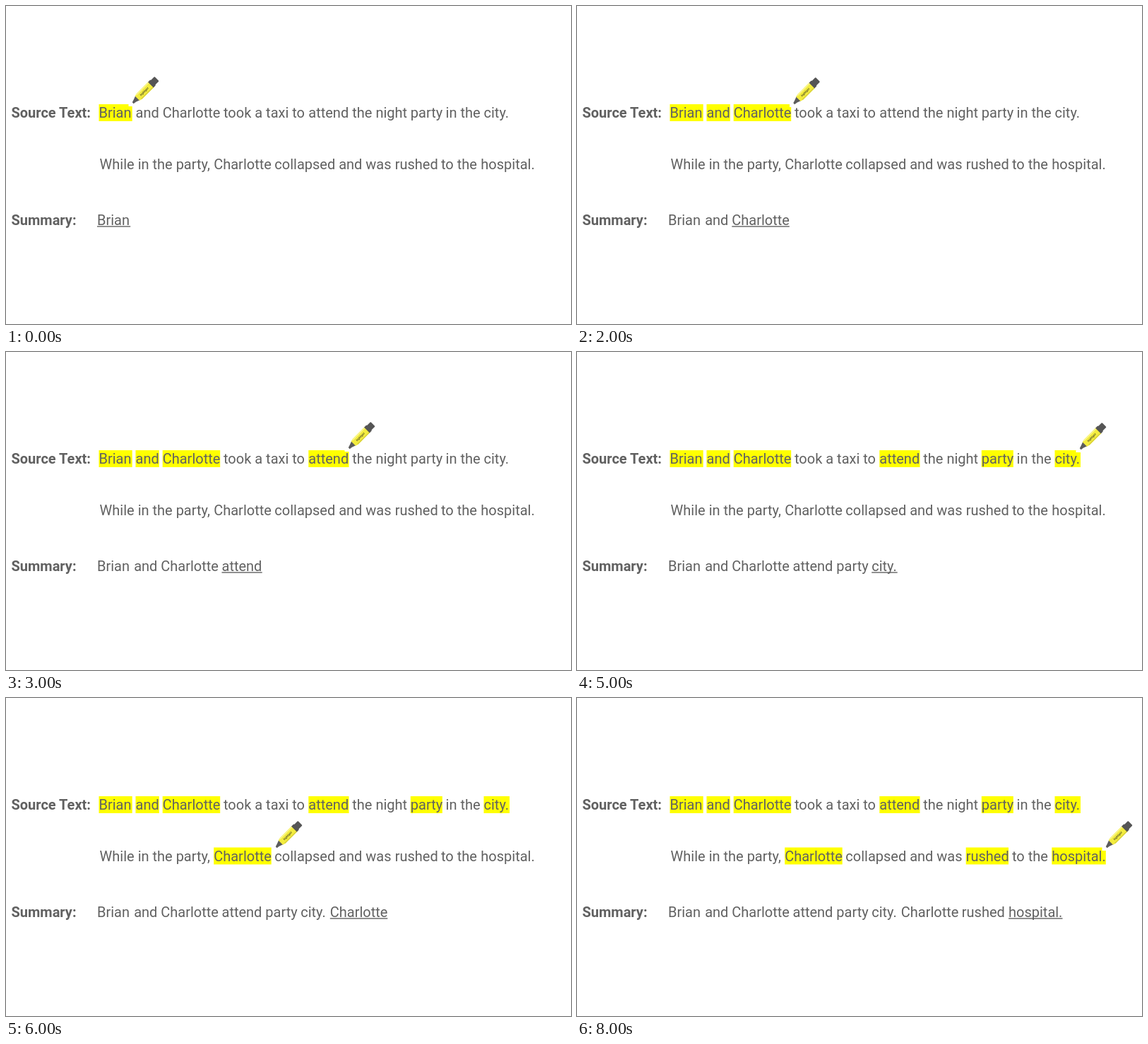
Animation of 800x450 px, one loop 9000 ms. Source, as an HTML page:

```html
<!DOCTYPE html>
<html lang="en">
<head>
<meta charset="utf-8">
<title>Extractive summary</title>
<style>
  html, body { margin: 0; width: 100%; height: 100%; overflow: hidden; background: #fff; }
  svg { display: block; width: 800px; height: 450px; }
  text { font: 20px Roboto, sans-serif; fill: #616161; }
  .label { font-weight: 700; }
  .brand { font: italic 700 4px Roboto, sans-serif; fill: #55552a; }
</style>
</head>
<body>
<svg viewBox="0 0 800 450">
  <g id="marks" fill="#ff0"></g>
  <g id="words">
    <text class="label" x="7.5" y="158">Source Text:</text>
    <text class="label" x="7.5" y="309.5">Summary:</text>
  </g>
  <rect id="line" y="311.3" height="1.4" fill="#616161"/>
  <g id="pen">
    <rect x="-6" y="-40" width="48" height="45" fill="#fff"/>
    <g transform="rotate(-45)">
      <path d="M0-1 4-2.2 10-4.5V4.5L4 2.2 0 1.6Z" fill="#5c5c5c"/>
      <path d="M9-4.5 13-5.5H37V5.5H13L9 4.5Z" fill="#f3ec3f"/>
      <path d="M10-4.4 13-5.5H37V-3.5H12Z" fill="#faf68c"/>
      <path d="M12 4H37V5.5H13Z" fill="#d9d23a"/>
      <path d="M36-5.5H40L41-4.5H47Q48-4.5 48-3.5V3.5Q48 4.5 47 4.5H41L40 5.5H36Z" fill="#555"/>
      <text class="brand" x="15" y="1.6">highlight</text>
    </g>
  </g>
</svg>
<script>
const $ = id => document.getElementById(id);
const BASE = [158, 230.5], STEP = 1000;

// word, row, x in the row, width, x in the summary, pen tip x and y
const steps = [
  ["Brian", 0, 131.5, 47.2, 129, 179.5, 137],
  ["and", 0, 183.5, 33.3, 181.2, 222.5, 137],
  ["Charlotte", 0, 221.7, 81.5, 219.3, 307, 138],
  ["attend", 0, 428.3, 57.2, 305.5, 485.5, 136],
  ["party", 0, 572.8, 45, 367.3, 622.5, 136],
  ["city.", 0, 676.5, 36.5, 417.2, 712.5, 137],
  ["Charlotte", 1, 294.2, 81.5, 458.8, 382.5, 211],
  ["rushed", 1, 550.7, 60.3, 544.8, 616.5, 211],
  ["hospital.", 1, 672.3, 76.5, 611, 749.5, 211],
];

// text between the chosen words
const rest = [
  ["took a taxi to", 0, 308],
  ["the night", 0, 490.3],
  ["in the", 0, 622.6],
  ["While in the party,", 1, 132.6],
  ["collapsed and was", 1, 380.3],
  ["to the", 1, 616],
];

function add(parent, tag, attrs, content = "") {
  const el = document.createElementNS("http://www.w3.org/2000/svg", tag);
  for (const key in attrs) el.setAttribute(key, attrs[key]);
  el.textContent = content;
  return parent.appendChild(el);
}

const write = (word, x, y) => add($("words"), "text", { x, y }, word);

for (const [word, row, x] of [...steps, ...rest]) write(word, x, BASE[row]);

const parts = steps.map(([word, row, x, width, sumX]) => [
  add($("marks"), "rect", { x, y: BASE[row] - 19, width, height: 24 }),
  write(word, sumX, 309.5),
]);

function draw() {
  const now = Math.floor(performance.now() / STEP) % steps.length;
  parts.forEach((pair, i) => pair.forEach(el => {
    el.style.visibility = i <= now ? "visible" : "hidden";
  }));
  const [, , , width, sumX, tipX, tipY] = steps[now];
  $("line").setAttribute("x", sumX);
  $("line").setAttribute("width", width);
  $("pen").setAttribute("transform", `translate(${tipX} ${tipY})`);
  requestAnimationFrame(draw);
}
draw();
</script>
</body>
</html>
```
